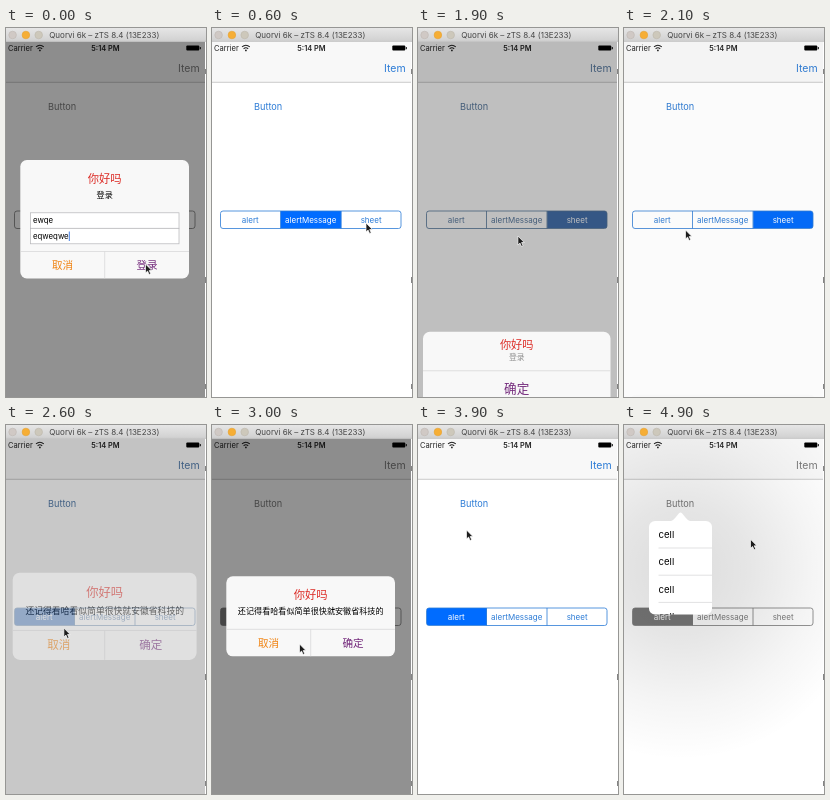
Write an HTML page that moves like this. It is 200 px wide and 369 px high and loops after 5.1 s.

```html
<!DOCTYPE html>
<html lang="zh">
<head>
<meta charset="utf-8">
<title>Alert styles</title>
<style>
  html, body { margin: 0; width: 100%; height: 100%; overflow: hidden; background: #fff; }
  svg { display: block; width: 100vw; height: 100vh; }
  text { font-family: Inter, "Noto Sans CJK SC", "Noto Sans CJK", sans-serif; }
  .mid { text-anchor: middle; }
  .tint { fill: var(--tint); }
  .line { stroke: var(--tint); fill: none; stroke-width: .8; }
  .rule { stroke: #d4d4d6; stroke-width: .7; }
  .red { fill: #dc2b25; }
  .orange { fill: #f0820f; }
  .purple { fill: #742a7c; }
</style>
</head>
<body>
<svg id="stage" viewBox="0 0 200 369" preserveAspectRatio="none">
  <defs>
    <linearGradient id="bar" x2="0" y2="1">
      <stop stop-color="#e6e6e6"/><stop offset="1" stop-color="#d0d0d0"/>
    </linearGradient>
    <radialGradient id="shade" gradientUnits="userSpaceOnUse" cx="57" cy="145" r="190">
      <stop stop-opacity=".14"/><stop offset=".35" stop-opacity=".1"/>
      <stop offset=".7" stop-opacity=".04"/><stop offset="1" stop-opacity="0"/>
    </radialGradient>
    <clipPath id="segClip"><rect x="8.5" y="183" width="180.5" height="17.5" rx="2.5"/></clipPath>
    <clipPath id="screen"><rect y="13.5" width="199" height="356"/></clipPath>
    <clipPath id="popClip"><rect x="25" y="96" width="63" height="93.5" rx="6"/></clipPath>
  </defs>

  <rect width="200" height="369" fill="#fff"/>
  <g clip-path="url(#screen)">
    <rect y="13" width="199" height="41" fill="#f8f8f8"/>
    <path d="M0 54.3H199" stroke="#b4b4b4" stroke-width=".7"/>
    <text x="2" y="23" font-size="7.6" fill="#222">Carrier</text>
    <path d="M30 18.9Q33.9 15.6 37.8 18.9M31.6 20.8Q33.9 18.8 36.2 20.8"
      fill="none" stroke="#222" stroke-width="1.1"/>
    <circle cx="33.9" cy="22.4" r=".9" fill="#222"/>
    <text class="mid" x="99.5" y="23" font-size="7.4" font-weight="600" fill="#222">5:14 PM</text>
    <rect x="180.3" y="17.6" width="13" height="5" rx="1"/>
    <rect x="193.8" y="19" width="1" height="2.2" rx=".5"/>
    <text class="tint" x="172" y="44" font-size="10.5">Item</text>
    <text class="tint" x="42" y="81.7" font-size="9.2">Button</text>

    <rect id="pick" y="183" width="60.5" height="17.5" clip-path="url(#segClip)"/>
    <rect class="line" x="8.5" y="183" width="180.5" height="17.5" rx="2.5"/>
    <path class="line" d="M68.5 183V200.5M129 183V200.5"/>
    <g id="segs"></g>

    <rect id="scrim" y="13" width="199" height="356"/>
    <g id="pop">
      <rect y="13" width="199" height="356" fill="url(#shade)"/>
      <path d="M46 96.5Q49 96 51.5 92.5L55 88.3Q56.5 86.8 58 88.3L61.5 92.5Q64 96 67 96.5Z" fill="#fff"/>
      <rect x="25" y="96" width="63" height="93.5" rx="6" fill="#fff"/>
      <g id="cells" clip-path="url(#popClip)"></g>
    </g>
    <g id="sheet"></g>
    <g id="login"></g>
    <g id="note"></g>
  </g>

  <rect width="200" height="13.5" fill="url(#bar)"/>
  <path d="M0 13.4H200" stroke="#b8b8b8" stroke-width=".6"/>
  <g stroke-width=".6">
    <circle cx="6.6" cy="7" r="3.8" fill="#d0c9c5" stroke="#beb7b3"/>
    <circle cx="19.9" cy="7" r="3.8" fill="#f6ae35" stroke="#e6a232"/>
    <circle cx="32.7" cy="7" r="3.8" fill="#cdc8bb" stroke="#bdb8ab"/>
  </g>
  <text class="mid" x="98.3" y="9.9" font-size="8" fill="#444">Quorvi 6k – zTS 8.4 (13E233)</text>
  <path d="M199.6 41V46M199.6 249V255M199.6 356V361" stroke="#555" stroke-width=".8"/>

  <path id="cursor" d="M0 0V9L2.1 7.1L3.6 10.5L5.2 9.8L3.7 6.5H6.4Z"
    fill="#1c1c1c" stroke="#fff" stroke-width=".7" stroke-linejoin="round"/>
</svg>
<script>
const LOOP = 5100, STEP = 100, LAST = 4900;
const TINT = [45, 124, 214], FILL = [0, 108, 255], GREY = 122;
const $ = id => document.getElementById(id);
const set = (id, name, value) => $(id).setAttribute(name, value);

const label = (s, x, y, size, cls = '') =>
  `<text class="mid ${cls}" x="${x}" y="${y}" font-size="${size}">${s}</text>`;
const box = (x, y, w, h, r, fill = '#f8f8f8') =>
  `<rect x="${x}" y="${y}" width="${w}" height="${h}" rx="${r}" fill="${fill}"/>`;
const rule = d => `<path class="rule" d="${d}"/>`;
const field = (s, y) =>
  `<rect x="24.5" y="${y}" width="148.5" height="15.5" fill="#fff" stroke="#b5b5b8" stroke-width=".7"/>
   <text x="27" y="${y + 10.3}" font-size="7.8">${s}</text>`;

function alertBox(top, bottom, msg, ok, extra = '') {
  const split = bottom - 27;
  return box(14.3, top, 168.7, bottom - top, 6.5) +
    label('你好吗', 98.7, top + 22.6, 11.3, 'red') +
    label(msg, 98.7, top + 37.8, 8.1) + extra +
    rule(`M14.3 ${split}H183M98.7 ${split}V${bottom}`) +
    label('取消', 56.5, bottom - 9.6, 10.6, 'orange') +
    label(ok, 141, bottom - 9.6, 10.6, 'purple');
}

$('login').innerHTML = alertBox(132, 250.5, '登录', '登录',
  field('ewqe', 184.8) + field('eqweqwe', 200.3) +
  '<path d="M63.3 203.5V213" stroke="#2f6fe0" stroke-width=".9"/>');
$('note').innerHTML = alertBox(151.3, 231.3, '还记得看哈看似简单很快就安徽省科技的', '确定');
$('sheet').innerHTML = box(5, 255.8, 187.5, 74.4, 7) +
  label('你好吗', 98.7, 273, 11.2, 'red') +
  `<g fill="#8e8e8e">${label('登录', 98.7, 283.8, 7.8)}</g>` +
  rule('M5 294.8H192.5') +
  label('确定', 98.7, 317.3, 12.6, 'purple') +
  box(5, 335.5, 187.5, 35.5, 7, '#fff') +
  label('取消', 98.7, 357.6, 12.6, 'orange');
$('segs').innerHTML = ['alert', 'alertMessage', 'sheet']
  .map((s, i) => label(s, 38.3 + i * 60.4, 194.8, 8)).join('');
$('cells').innerHTML = [0, 1, 2, 3].map(i => {
  const y = 113.2 + i * 27.2;
  return `<text x="34.5" y="${y}" font-size="9.6">cell</text>` + rule(`M34.5 ${y + 9.8}H88`);
}).join('');

// pointer stops: ms, x, y
const stops = [
  [100, 139.5, 236], [500, 154, 195], [800, 154, 195], [1300, 157.5, 217], [1600, 157.5, 217],
  [2100, 61.5, 202], [2400, 43, 195], [3000, 87.5, 219], [3300, 63, 219], [3900, 48.5, 105],
  [4200, 54, 82], [4900, 126.5, 114.3]
];

const unit = k => Math.min(1, Math.max(0, k));
const smooth = k => k * k * (3 - 2 * k);
const rise = (t, from, span = 400) => smooth(unit((t - from) / span));
const shown = (t, on, off, span) => rise(t, on, span) - rise(t, off, span);

function pointer(t) {
  const i = Math.max(1, stops.findIndex(s => s[0] >= t));
  const [t0, x0, y0] = stops[i - 1], [t1, x1, y1] = stops[i];
  const k = unit((t - t0) / (t1 - t0));
  return `${x0 + (x1 - x0) * k} ${y0 + (y1 - y0) * k}`;
}

function draw(t) {
  const login = 1 - rise(t, 100);
  const sheet = shown(t, 700, 1700, 450);
  const note = shown(t, 2400, 3200);
  const pop = rise(t, 4100);
  const dim = Math.max(login, sheet, note);
  const grey = Math.max(dim, pop);
  const picked = t < 700 ? 1 : t < 2300 ? 2 : 0;
  const fade = rgb => `rgb(${rgb.map(c => Math.round(c + (GREY - c) * grey))})`;

  $('stage').style.setProperty('--tint', fade(TINT));
  set('pick', 'fill', fade(FILL));
  set('pick', 'x', 8.4 + picked * 60.4);
  [...$('segs').children].forEach((s, i) => { s.style.fill = i === picked ? '#fff' : 'var(--tint)'; });

  set('scrim', 'opacity', dim * .43);
  set('login', 'opacity', login);
  set('note', 'opacity', note);
  set('note', 'transform',
    `translate(98.7 191.3) scale(${1.18 - .18 * rise(t, 2400)}) translate(-98.7 -191.3)`);
  set('pop', 'opacity', pop);
  set('sheet', 'transform', `translate(0 ${115 * (1 - sheet)})`);
  set('cursor', 'transform', `translate(${pointer(t)})`);
}

const start = performance.now();
function tick() {
  const t = (performance.now() - start) % LOOP;
  draw(Math.min(Math.floor(t / STEP) * STEP, LAST));
  requestAnimationFrame(tick);
}
tick();
</script>
</body>
</html>
```
